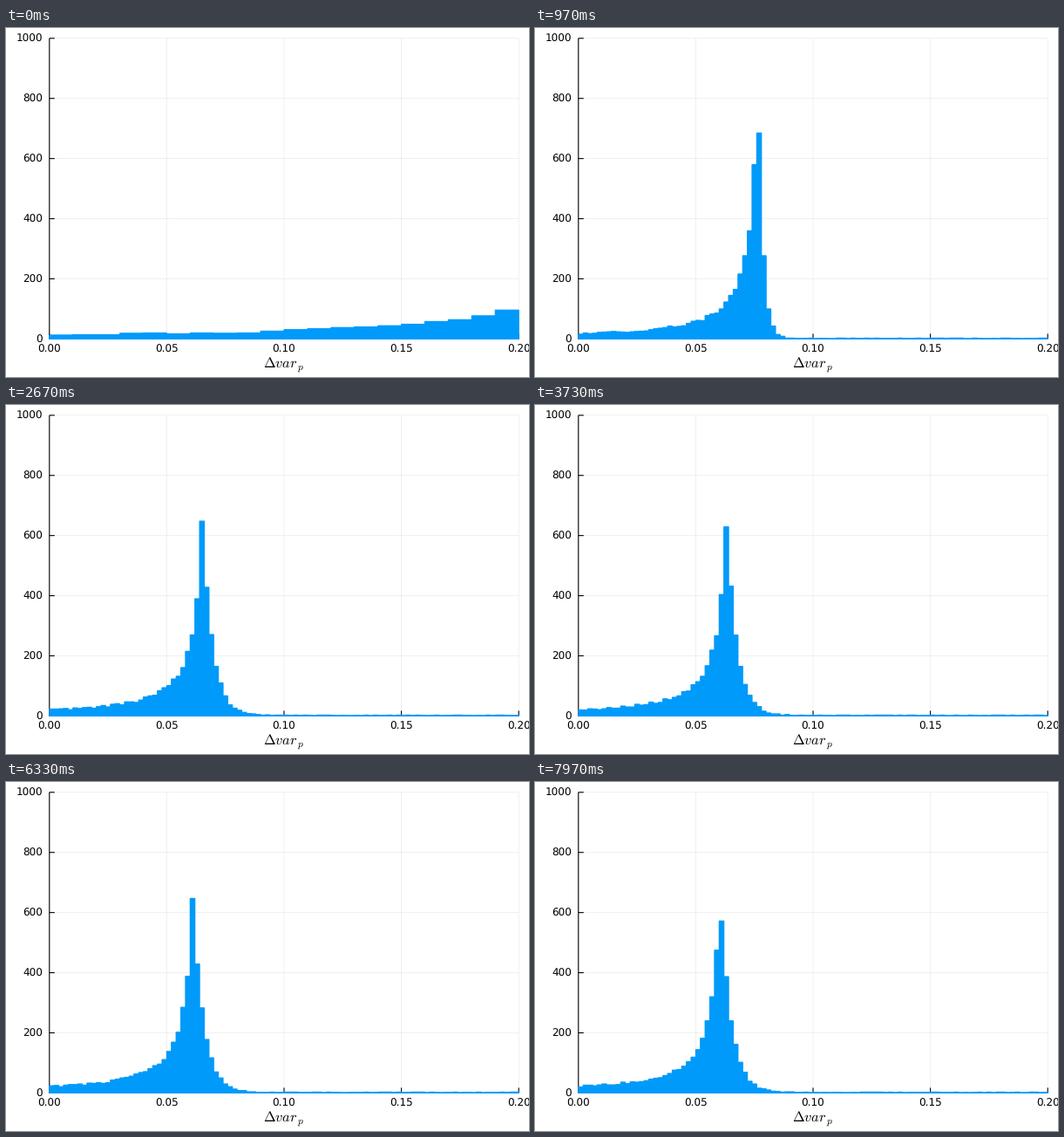
A matplotlib script for the animation above (8000 ms loop, 600 by 400 pixels).

```python
import numpy as np
import matplotlib.pyplot as plt
from matplotlib.animation import FuncAnimation
from matplotlib.patches import Polygon

W, H, DPI = 600, 400, 100
FRAMES, LOOP = 240, 8000
LEFT, RIGHT, TOP, BOTTOM = 49.8, 588.2, 11.8, 356.4
X_MAX, Y_MAX = 0.2, 1000
BLUE = "#009afa"
N = 4100      # samples under the peak
UNIT = 0.002  # length scale of the slopes
FLOOR = 2.2   # background counts per unit

plt.rcParams["font.family"] = "DejaVu Sans"
plt.rcParams["mathtext.fontset"] = "cm"
plt.rcParams["text.hinting"] = "none"

rng = np.random.default_rng(7)
phase = rng.uniform(0, 2 * np.pi, 400)
speed = rng.uniform(0.02, 0.12, 400)

# step: peak centre, left slope, left power, right reach, right power
KEYS = {
    0: (0.287, 0.056, 7, 7, 2),
    8: (0.110, 0.14, 7, 2.9, 2),
    29: (0.0764, 0.715, 1.3, 1.1, 1.03),
    80: (0.065, 0.60, 1.3, 2.2, 1.03),
    239: (0.0603, 0.60, 1.3, 2.4, 1.05),
}


def settle(t):
    return -1 / (np.asarray(t) + 2)


def params(t):
    """Shape at step t, relaxing like 1/t from key to key."""
    logs = np.log(list(KEYS.values())).T
    when = settle(list(KEYS))
    return [np.exp(np.interp(settle(t), when, row)) for row in logs]


def histogram(t):
    width = 0.01 if t < 3 else 0.005 if t < 11 else 0.002
    centre, slope, power, reach, bend = params(t)
    x = (np.arange(round(0.6 / width)) + 0.5) * width
    d = (x - centre) / UNIT
    left = (1 + slope * np.maximum(-d, 0) / power) ** -power
    right = np.exp(-(np.maximum(d, 0) / reach) ** bend)
    shape = left * right
    counts = N * shape / shape.sum() + FLOOR * width / UNIT
    bins = round(X_MAX / width)
    counts = counts[:bins]
    jitter = np.sin(phase[:bins] + speed[:bins] * t)
    counts = np.round(counts + 0.6 * np.sqrt(counts) * jitter)
    return np.linspace(0, X_MAX, bins + 1), counts


def px(x):
    return LEFT + (RIGHT - LEFT) * np.asarray(x) / X_MAX


def py(y):
    return BOTTOM - (BOTTOM - TOP) * np.asarray(y) / Y_MAX


def pt(pixels):
    return pixels * 72 / DPI


def outline(t):
    edges, counts = histogram(t)
    x = np.repeat(edges, 2)
    y = np.concatenate([[0], np.repeat(np.minimum(counts, Y_MAX), 2), [0]])
    return np.column_stack([px(x), py(y)])


fig = plt.figure(figsize=(W / DPI, H / DPI), dpi=DPI, facecolor="white")
ax = fig.add_axes([0, 0, 1, 1])
ax.set(xlim=(0, W), ylim=(H, 0))
ax.axis("off")


def line(x, y, width=1.1, **style):
    ax.plot(x, y, color="black", lw=pt(width), solid_capstyle="butt",
            snap=False, **style)


def label(x, y, text, size=12, ha="center"):
    ax.text(x, y, text, fontsize=pt(size), ha=ha, va="baseline")


for v in np.linspace(0, X_MAX, 5):
    x = px(v)
    line([x, x], [TOP, BOTTOM], 0.65, alpha=0.09)
    line([x, x], [BOTTOM, BOTTOM - 6])
    label(x, 371.8, f"{v:.2f}")
for v in range(0, Y_MAX + 1, 200):
    y = py(v)
    line([LEFT, RIGHT], [y, y], 0.65, alpha=0.09)
    line([LEFT, LEFT + 6], [y, y])
    label(42, y + 4.5, str(v), ha="right")
line([LEFT, LEFT], [TOP, BOTTOM])
line([LEFT, RIGHT], [BOTTOM, BOTTOM])
label(318, 389, r"$\Delta var_{\,p}$", 16.4)

bars = Polygon(outline(0), closed=True, facecolor=BLUE, edgecolor=BLUE,
               lw=pt(1.2), joinstyle="miter", snap=False, zorder=3)
ax.add_patch(bars)


def update(t):
    bars.set_xy(outline(t))
    return [bars]


anim = FuncAnimation(fig, update, frames=FRAMES, interval=LOOP / FRAMES,
                     repeat=True, repeat_delay=0)
plt.show()
```
